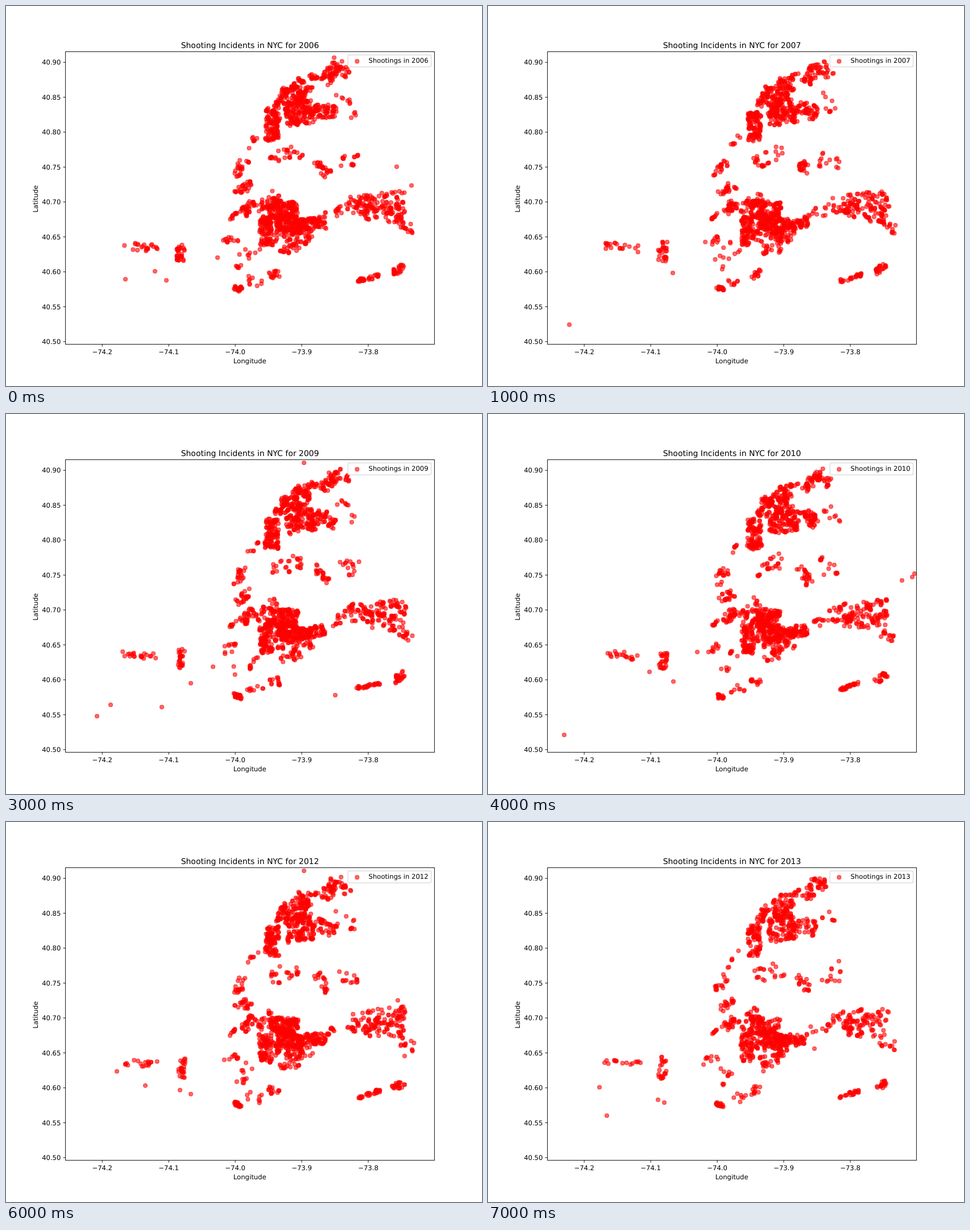
Recreate the animation shown at these times as an HTML page with a canvas. Size 837 by 669 pixels, loop 8000 ms.

```html
<!DOCTYPE html>
<html lang="en">
<head>
<meta charset="utf-8">
<title>Shooting Incidents in NYC</title>
<style>
  html, body { margin: 0; width: 100%; height: 100%; overflow: hidden; background: #fff; }
  canvas, svg { position: absolute; left: 0; top: 0; width: 837px; height: 669px; }
  text { font-family: "DejaVu Sans", sans-serif; font-size: 11.62px; text-rendering: geometricPrecision; }
  #title { font-size: 13.95px; }
  .mid { text-anchor: middle; }
  .end { text-anchor: end; }
  .line { fill: none; stroke: #000; stroke-width: .93; }
</style>
</head>
<body>
<canvas id="plot" width="837" height="669"></canvas>
<svg id="axes" viewBox="0 0 837 669">
  <rect class="line" x="104.6" y="80.4" width="648.8" height="515.2"/>
  <path id="ticks" class="line"/>
  <text id="title" class="mid" x="429" y="73.6"></text>
  <text class="mid" x="428.7" y="629">Longitude</text>
  <text class="mid" transform="translate(56.2 339.5) rotate(-90)">Latitude</text>
  <rect x="601.2" y="86.2" width="146.4" height="20.9" rx="2.3" fill="#fff" fill-opacity=".8" stroke="#ccc" stroke-opacity=".8" stroke-width="1.16"/>
  <circle cx="617.4" cy="97.4" r="3.49" fill="#f00" fill-opacity=".6" stroke="#f00" stroke-opacity=".6" stroke-width="1.16"/>
  <text id="legend" x="637.6" y="100.2"></text>
</svg>
<script>
const $ = id => document.getElementById(id);
const FIRST = 2006, STEP = 1000, YEARS = 8;

// Axes
const label = (x, y, cls, text) => {
  const el = document.createElementNS('http://www.w3.org/2000/svg', 'text');
  el.setAttribute('x', x);
  el.setAttribute('y', y);
  el.setAttribute('class', cls);
  el.textContent = text;
  $('axes').append(el);
};
let ticks = '';
for (let i = 0; i < 5; i++) {
  const x = 169.2 + 116.95 * i;
  ticks += `M${x} 595.6v4.07`;
  label(x, 613, 'mid', '\u2212' + (74.2 - i / 10).toFixed(1));
}
for (let i = 0; i < 9; i++) {
  const y = 590.9 - 61.46 * i;
  ticks += `M104.6 ${y}h-4.07`;
  label(96.4, y + 4.2, 'end', (40.5 + i / 20).toFixed(2));
}
$('ticks').setAttribute('d', ticks);

const random = seed => () => {
  seed = seed + 0x6D2B79F5 | 0;
  let t = Math.imul(seed ^ seed >>> 15, 1 | seed);
  t = t + Math.imul(t ^ t >>> 7, 61 | t) ^ t;
  return ((t ^ t >>> 14) >>> 0) / 4294967296;
};

// A district is a band around a line: typical count, both ends, half width
const bands = [];
const band = (count, x1, y1, x2, y2, r) => bands.push({ count, x1, y1, x2, y2, r });

// Harlem and the Bronx
band(115, 467, 237, 469, 184, 12);
band(42, 475, 178, 494, 144, 6);
band(150, 492, 191, 541, 183, 22);
band(100, 502, 168, 526, 134, 16);
band(55, 540, 178, 580, 190, 13);
band(16, 518, 133, 548, 122, 5);
band(50, 560, 136, 580, 102, 10);
band(16, 584, 98, 602, 126, 8);
band(9, 586, 152, 614, 195, 9);
// Manhattan
band(7, 442, 228, 418, 256, 4);
band(20, 401, 300, 420, 270, 8);
band(24, 404, 330, 432, 314, 8);
// Brooklyn
band(34, 416, 366, 434, 344, 8);
band(26, 442, 362, 475, 328, 9);
band(165, 462, 357, 513, 362, 16);
band(130, 476, 378, 520, 390, 14);
band(100, 456, 372, 457, 421, 11);
band(90, 514, 386, 562, 380, 10);
band(70, 470, 402, 540, 402, 14);
band(22, 482, 430, 518, 422, 9);
band(10, 382, 416, 408, 410, 7);
band(12, 402, 462, 436, 420, 14);
band(9, 393, 376, 404, 364, 1);
band(26, 401, 495, 415, 499, 3);
band(8, 420, 481, 455, 490, 8);
band(14, 462, 474, 480, 470, 7);
// Queens
band(26, 466, 274, 520, 256, 14);
band(24, 545, 268, 566, 298, 8);
band(14, 582, 268, 620, 274, 14);
band(14, 564, 372, 604, 352, 10);
band(95, 604, 353, 704, 340, 17);
band(60, 626, 360, 700, 370, 14);
band(14, 690, 384, 718, 394, 8);
band(30, 617, 485, 657, 473, 3);
band(24, 681, 470, 700, 458, 6);
// Staten Island
band(20, 203, 421, 268, 428, 6);
band(28, 306, 449, 309, 414, 7);

// Share of the typical count, then the outlying dots of that year
const years = {};
const year = (n, share, ...far) => years[n] = { share, far };

year(2006, 1.12, [372, 443], [262, 467], [282, 483], [210, 481], [687, 283], [577, 91], [713, 316]);
year(2007, 1, [143, 561], [325, 470]);
year(2008, .94, [111, 576], [175, 540], [211, 496], [220, 483], [278, 497], [359, 450], [713, 313]);
year(2009, 1.02, [524, 86], [160, 532], [184, 512], [274, 516], [325, 474], [364, 445], [579, 495]);
year(2010, 1, [134, 565], [326, 471], [284, 454], [368, 419], [728, 293], [746, 287], [750, 281]);
year(2011, .98, [181, 564], [320, 472]);
year(2012, .94, [524, 86], [195, 439], [245, 464], [325, 479], [306, 472], [689, 314], [701, 412]);
year(2013, .76, [196, 467], [209, 517], [299, 489], [310, 494], [379, 427], [617, 245], [574, 399]);

// Incidents often repeat at or beside the last place
const fill = ({ count, x1, y1, x2, y2, r }, share, rnd) => {
  const dx = x2 - x1, dy = y2 - y1, len = Math.hypot(dx, dy);
  const dots = [];
  while (dots.length < count * share) {
    const last = dots[dots.length - 1];
    if (last && rnd() < .3) {
      dots.push(last.map(v => v + (rnd() - .5) * 4));
      continue;
    }
    const t = rnd(), side = (rnd() * 2 - 1) * r / len;
    dots.push([x1 + dx * t - dy * side, y1 + dy * t + dx * side]);
  }
  return dots;
};

const ctx = $('plot').getContext('2d');
ctx.beginPath();
ctx.rect(104.6, 80.4, 648.8, 515.2);
ctx.clip();
ctx.fillStyle = ctx.strokeStyle = 'rgba(255, 0, 0, .6)';
ctx.lineWidth = 1.16;

const draw = n => {
  const { share, far } = years[n], rnd = random(n * 31);
  ctx.clearRect(0, 0, 837, 669);
  for (const [x, y] of [...bands.flatMap(b => fill(b, share, rnd)), ...far]) {
    ctx.beginPath();
    ctx.arc(x, y, 3.49, 0, 2 * Math.PI);
    ctx.fill();
    ctx.stroke();
  }
  $('title').textContent = `Shooting Incidents in NYC for ${n}`;
  $('legend').textContent = `Shootings in ${n}`;
};

const start = performance.now();
let shown;
const tick = () => {
  const n = FIRST + Math.floor((performance.now() - start) / STEP) % YEARS;
  if (n !== shown) draw(shown = n);
  requestAnimationFrame(tick);
};
tick();
</script>
</body>
</html>
```
